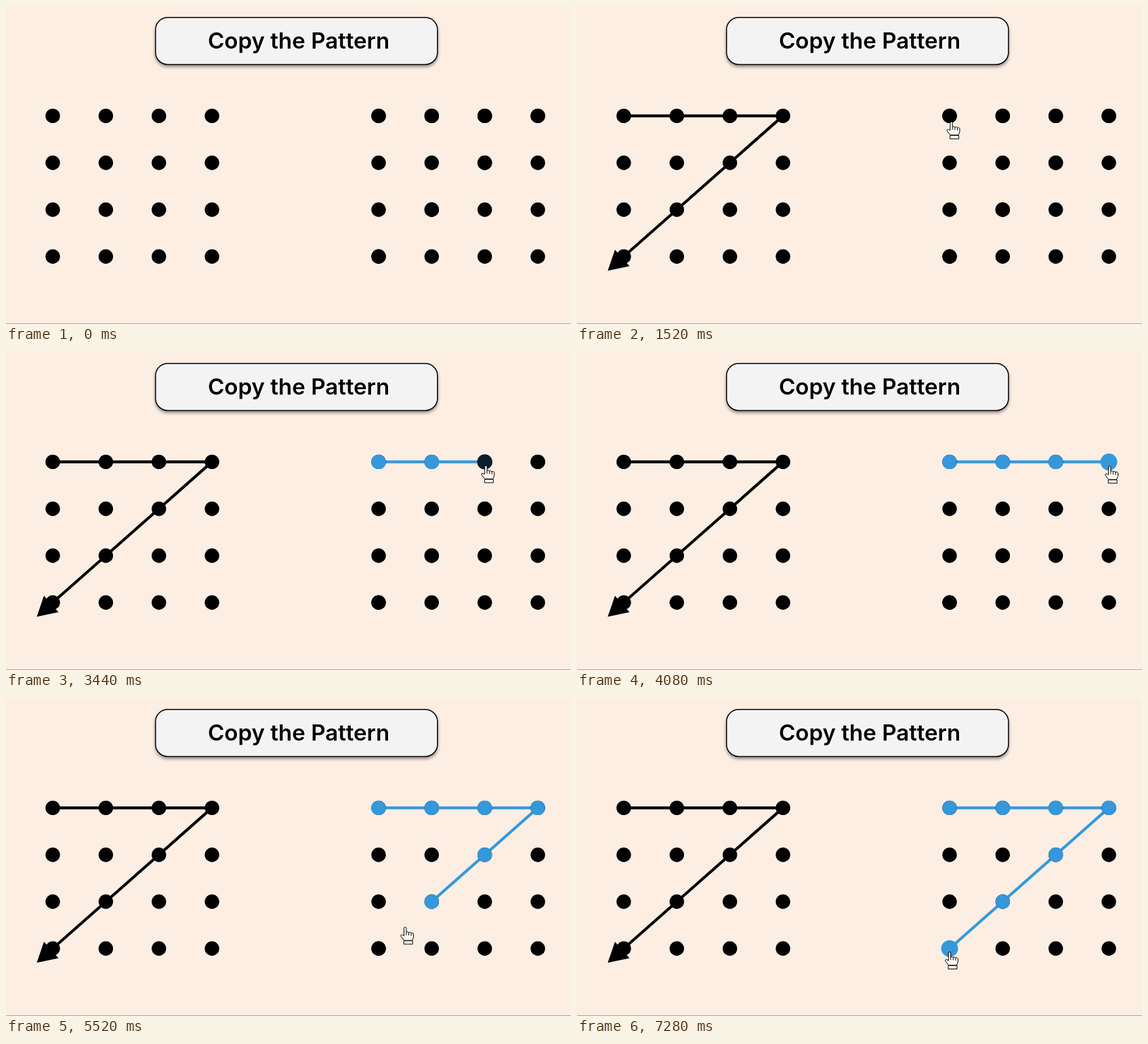
An HTML page that plays this animation: 834x470 px, repeating every 7.36 s.

```html
<!DOCTYPE html>
<html lang="en">
<head>
<meta charset="utf-8">
<title>Copy the Pattern</title>
<style>
  html, body { margin: 0; width: 100%; height: 100%; overflow: hidden; background: #fdeee4; }
  svg { display: block; width: 834px; height: 470px; }
  .panel { fill: #f3f3f3; stroke: #000; stroke-width: 1.5; filter: drop-shadow(0 3px 2px rgba(0, 0, 0, .4)); }
  .title { font: 600 33.1px Inter, Roboto, sans-serif; text-anchor: middle; text-shadow: 1px 2px 2px #fff; }
  .trace { fill: none; stroke-width: 4.2; stroke-linejoin: round; }
  .hand { fill: #fff8f2; stroke: #000; stroke-linejoin: round; }
</style>
</head>
<body>
<svg viewBox="0 0 834 470">
  <rect width="834" height="470" fill="#fdeee4"/>
  <rect y="469" width="834" height="1" fill="#aaa5a2"/>
  <rect class="panel" x="220.7" y="17" width="416.2" height="69.4" rx="18"/>
  <text class="title" x="432.1" y="63">Copy the Pattern</text>
  <polyline id="model" class="trace" stroke="#000" pathLength="1" stroke-dasharray="1 2"/>
  <path id="head" transform="translate(69 370.3) rotate(138.5)" d="M31.5 0 3-16.2V16.2Z"/>
  <polyline id="copy" class="trace" stroke="#3498db"/>
  <g id="dots"></g>
  <g id="hand" class="hand">
    <path d="M-1.7 13V2a1.7 1.7 0 0 1 3.4 0V8q1.8-2 3.6 .5 1.8-1.8 3.6 .7 2-1.5 3.5 1V15l-2 5H-1.5L-6.5 13.5q0-3.5 4.8-.5Z"/>
    <path d="M1.7 8v4m3.6-3.5v4m3.6-3.3v4" fill="none"/>
    <rect x="-2" y="20.5" width="13" height="5"/>
  </g>
</svg>
<script>
  const LOOP = 7360, STEP = 80, RADIUS = 10.7, PULSE = 300, HAND_IN = 960;
  const litAt = [2060, 2860, 3410, 3930, 4720, 5220, 7120];

  // The pattern is a Z without its foot: along the top row, then down the diagonal.
  const route = litAt.map((_, i) => i < 4 ? [i, 0] : [6 - i, i - 3]);

  // Where the fingertip changes direction: time, x, y
  const turns = [
    [HAND_IN, 525, 160], [1480, 552.5, 171], [2380, 554, 167], [3980, 787, 168],
    [4220, 785, 169], [5840, 541, 380], [6000, 540, 386], [6720, 540, 386], [7040, 550, 375]
  ];

  const $ = id => document.getElementById(id);
  const clamp = v => Math.max(0, Math.min(1, v));
  const spot = (left, [col, row]) => [left + col * 78.35, 162.4 + row * 69.3];
  const show = (id, on) => $(id).style.visibility = on ? "visible" : "hidden";

  function addDot(left, cell) {
    const dot = document.createElementNS("http://www.w3.org/2000/svg", "circle");
    const [x, y] = spot(left, cell);
    dot.setAttribute("cx", x);
    dot.setAttribute("cy", y);
    dot.setAttribute("r", RADIUS);
    $("dots").append(dot);
    return dot;
  }

  for (let i = 0; i < 16; i++) {
    const cell = [i % 4, Math.floor(i / 4)];
    addDot(69, cell);
    addDot(550, cell);
  }
  const active = route.map(cell => addDot(550, cell));
  const copyPoints = route.map(cell => spot(550, cell));
  $("model").setAttribute("points", route.map(cell => spot(69, cell)).join(" "));

  function fingertip(t) {
    const next = turns.findIndex(([time]) => time > t);
    if (next < 0) return turns.at(-1).slice(1);
    const [t0, x0, y0] = turns[Math.max(0, next - 1)];
    const [t1, x1, y1] = turns[next];
    const p = t1 > t0 ? (t - t0) / (t1 - t0) : 0;
    return [x0 + (x1 - x0) * p, y0 + (y1 - y0) * p];
  }

  function draw(t) {
    const drawn = clamp((t - 80) / 720);
    show("model", t >= 160);
    show("head", drawn === 1);
    $("model").setAttribute("stroke-dashoffset", 1 - drawn);

    active.forEach((dot, i) => {
      const age = t - litAt[i];
      const mix = clamp(age / 150);
      dot.setAttribute("r", RADIUS + 1.7 * Math.sin(Math.PI * clamp(age / PULSE)));
      dot.setAttribute("fill", `rgb(${52 * mix},${152 * mix},${219 * mix})`);
    });
    const lit = litAt.filter(time => time <= t).length;
    $("copy").setAttribute("points", copyPoints.slice(0, lit).join(" "));

    show("hand", t >= HAND_IN);
    $("hand").setAttribute("transform", `translate(${fingertip(t)})`);
  }

  const start = performance.now();
  function tick() {
    const t = (performance.now() - start) % LOOP;
    draw(Math.floor(t / STEP) * STEP);
    requestAnimationFrame(tick);
  }
  tick();
</script>
</body>
</html>
```
